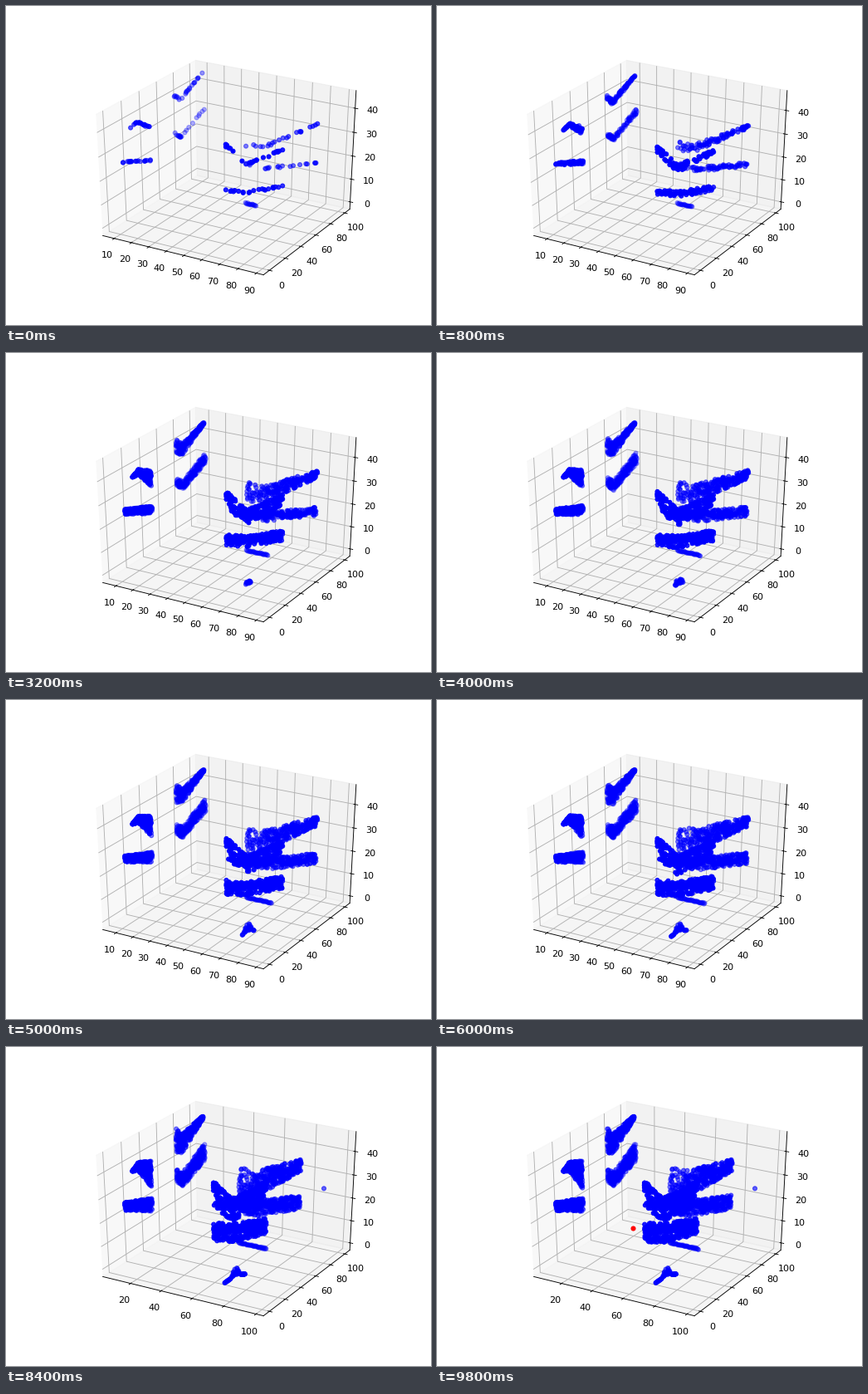
These frames come from a looping animation (512 px wide and 384 px high, 10000 ms). A matplotlib script:

```python
import numpy as np
import matplotlib.pyplot as plt
from matplotlib.animation import FuncAnimation

W, H, DPI = 512, 384, 80
FRAMES, STEP = 50, 200
WIDEN, FAR = 2, 32  # frames in which the axes rescale
rng = np.random.default_rng(7)


def sheet(*keys, up, down, first=22, rest=330):
    """Points of one scanned wall and the frame in which each appears.

    The scan starts as a line through the (x, y, z) keys and thickens up and
    down in z; both spreads run from the first key to the last.
    """
    keys = np.array(keys, float)
    legs = np.linalg.norm(np.diff(keys, axis=0), axis=1)
    at = np.r_[0, np.cumsum(legs)] / legs.sum()
    s = rng.uniform(0, 1, first + rest)
    s[0], s[1] = 0, 1
    w = np.r_[rng.uniform(-0.1, 0.1, first), rng.uniform(-1, 1, rest)]

    x, y, z = (np.interp(s, at, col) for col in keys.T)
    spread = [np.interp(s, [0, 1], ends) for ends in (down, up)]
    z = np.clip(z + w * np.where(w > 0, spread[1], spread[0]), 0, 45)

    born = np.maximum(46 * w ** 2, rng.uniform(0, 5, s.size))
    born[:first] = 0
    return np.stack([x, y, z]), born


def floor_line(n=45):
    s = np.linspace(0, 1, n)
    x = 49 + 19 * s
    born = 45 * np.clip((s - 0.33) / 0.67, 0, 1) ** 1.5
    return np.stack([x, np.full(n, 71), rng.uniform(0, 0.6, n)]), born


def floor_wedge(n=70):
    """Small triangle that spreads from its middle."""
    s = rng.uniform(-1, 1, n)
    peak = np.clip(1 - 2 * np.abs(s), 0, 1) * 4
    h = rng.uniform(0, 1, n)
    x = 70 + 4 * np.clip(s, 0, 1)
    y = 27 + np.where(s > 0, 4, 14) * s
    born = 9 + np.maximum(29 * np.abs(s), 20 * h * peak / 4)
    return np.stack([x, y, h * peak]), born


PARTS = [
    # left wall
    sheet((8, 10, 25), (8, 41, 19), up=(1, 2), down=(2.5, 4)),
    sheet((8, 20, 37), (8, 27, 38), (8, 41, 33), up=(0, 4), down=(0, 8)),
    sheet((8, 71, 40), (8, 78, 37), (12, 97, 45), up=(5, 0.5), down=(6, 1)),
    sheet((8, 71, 24), (8, 78, 21), (12, 99, 29.5), up=(3, 4), down=(3, 4)),
    # near corner
    sheet((70, 0, 44), (81, 0, 38), (88, 27, 39), up=(2, 3), down=(9, 4)),
    sheet((70, 0, 26), (81, 0, 27), (88, 28, 24), up=(3, 3), down=(5, 4)),
    # back wall
    sheet((49, 71, 25), (59, 71, 26), (88, 71, 40), up=(9, 2), down=(5, 3)),
    sheet((49, 71, 17.5), (61, 71, 17.5), (88, 71, 24), up=(3, 3), down=(4, 3)),
    floor_line(),
    floor_wedge(),
    (np.array([[98], [81], [29]]), np.array([FAR])),
]
POINTS = np.concatenate([p for p, _ in PARTS], axis=1)
BORN = np.concatenate([b for _, b in PARTS])
GOAL = (50, 24, 18)

fig = plt.figure(figsize=(W / DPI, H / DPI), dpi=DPI)
ax = fig.add_subplot(projection="3d")
# Fill the whole subplot with a unit cube rather than a square
ax.apply_aspect = lambda position=None: None
ax.set_box_aspect((1, 1, 1), zoom=np.sqrt(3) / 1.8294640721620434)
ax.view_init(elev=30, azim=-60)


def padded(lo, hi):
    """Data range with a 5% margin plus the gap between limits and panes."""
    m = (hi - lo) * (0.05 + 1.1 / 48)
    return lo - m, hi + m


def set_axes(i):
    ax.set_xticks(range(20, 101, 20) if i >= FAR else range(10, 91, 10))
    ax.set_yticks(range(0, 101, 20))
    ax.set_zticks(range(0, 41, 10))
    ax.set_xlim(*padded(9 if i < WIDEN else 8, 98 if i >= FAR else 88))
    ax.set_ylim(*padded(0, 100))
    ax.set_zlim(*padded(0, 44 if i < WIDEN else 45))


def draw(i):
    for dots in list(ax.collections):
        dots.remove()
    ax.scatter(*POINTS[:, BORN <= i], c="b", s=20)
    if i == FRAMES - 1:
        ax.scatter(*GOAL, c="r", s=20)
    set_axes(i)
    return ax.collections


anim = FuncAnimation(fig, draw, frames=FRAMES, interval=STEP,
                     repeat=True, repeat_delay=0, blit=False)
plt.show()
```
